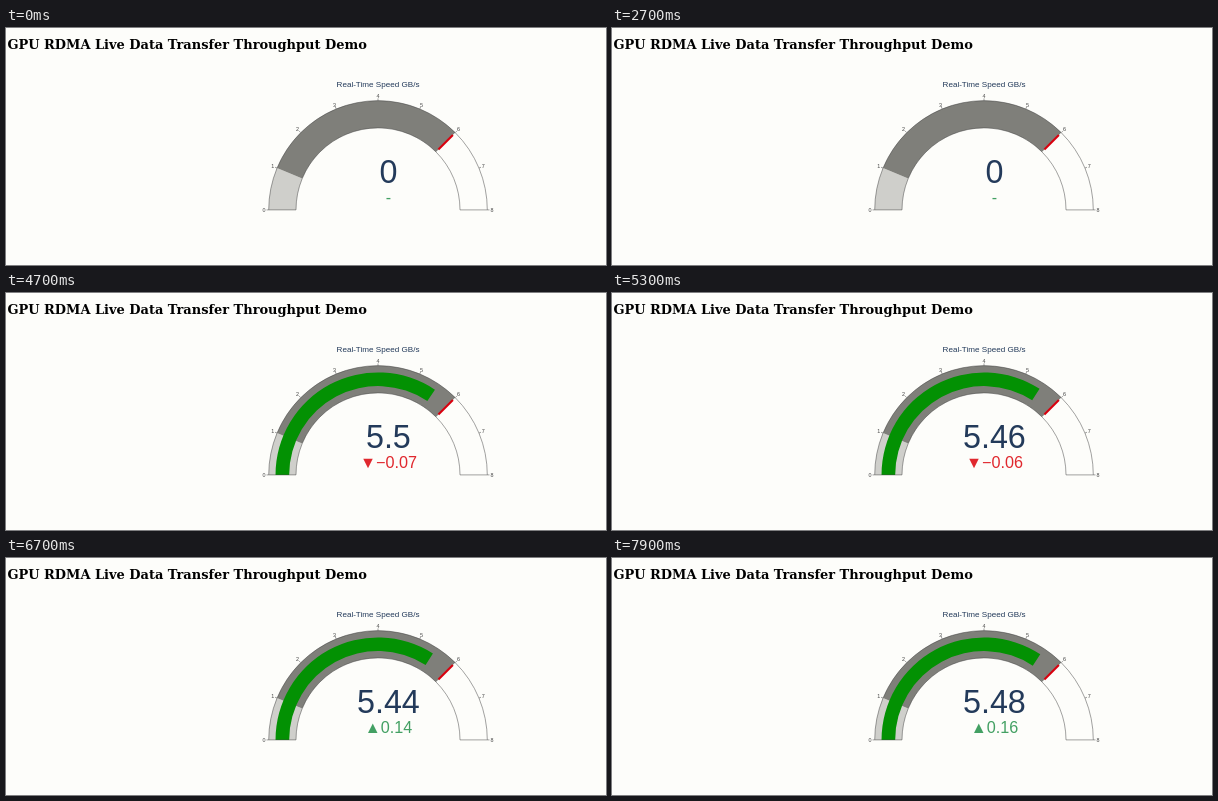
Write an HTML page that moves like this. It is 600 px wide and 237 px high and loops after 8000 ms.

```html
<!DOCTYPE html>
<html lang="en">
<head>
<meta charset="utf-8">
<title>Throughput gauge</title>
<style>
  html, body { margin: 0; width: 100%; height: 100%; overflow: hidden; background: #fdfdfa; }
  svg { display: block; width: 100%; height: 100%; }
  text { font-family: "Liberation Sans", Arial, sans-serif; fill: #233a5a; text-anchor: middle; }
  .heading { font: bold 12.96px "DejaVu Serif", serif; fill: #000; text-anchor: start; }
  .label { font-size: 8.1px; }
  .tick { font-size: 5.4px; fill: #444; }
  .line { fill: none; stroke: #444; stroke-width: .5; }
  #number { font-size: 32.3px; }
  #delta { font-size: 16.2px; }
</style>
</head>
<body>
<svg viewBox="0 0 600 237">
  <text class="heading" x="1.5" y="20.7">GPU RDMA Live Data Transfer Throughput Demo</text>
  <text class="label" x="372" y="59.3">Real-Time Speed GB/s</text>
  <path id="low" fill="#cfcfcb"/>
  <path id="high" fill="#7f7f7a"/>
  <path id="bar" fill="#039103"/>
  <path id="outline" class="line"/>
  <path id="threshold" stroke="#d8000e" stroke-width="2.1"/>
  <path id="ticks" class="line"/>
  <g id="tickLabels"></g>
  <text id="number" x="382.4" y="155.4"></text>
  <text id="delta" x="382.5" y="174.8"></text>
</svg>
<script>
const LOOP = 8000, START = 3900, STEP = 100;
const MAX = 8, CX = 372, CY = 181.9, INNER = 82, OUTER = 109.3;
const MIDDLE = (INNER + OUTER) / 2, WIDTH = OUTER - INNER;

// One reading per step, in GB/s
const readings = [
  5.54, 5.49, 5.46, 5.51, 5.48, 5.44, 5.52, 5.57, 5.5,
  5.47, 5.5, 5.43, 5.49, 5.52, 5.46, 5.51, 5.48, 5.45,
  5.5, 5.47, 5.53, 5.54, 5.48, 5.51, 5.46, 5.49, 5.52,
  5.3, 5.44, 5.5, 5.47, 5.52, 5.45, 5.49, 5.53, 5.48,
  5.46, 5.51, 5.47, 5.32, 5.48
];

const $ = id => document.getElementById(id);
const setPath = (id, d) => $(id).setAttribute("d", d);

function point(value, radius) {
  const angle = Math.PI * (1 - value / MAX);
  return [CX + radius * Math.cos(angle), CY - radius * Math.sin(angle)];
}

const spoke = (value, r1, r2) => `M${point(value, r1)}L${point(value, r2)}`;

function band(from, to, thickness = 1) {
  const inner = MIDDLE - WIDTH * thickness / 2;
  const outer = MIDDLE + WIDTH * thickness / 2;
  return `M${point(from, inner)}L${point(from, outer)}` +
    `A${outer} ${outer} 0 0 1 ${point(to, outer)}L${point(to, inner)}` +
    `A${inner} ${inner} 0 0 0 ${point(from, inner)}Z`;
}

function buildDial() {
  setPath("low", band(0, 1));
  setPath("high", band(1, 6));
  setPath("outline", band(0, MAX));
  setPath("threshold", spoke(6, MIDDLE - WIDTH * .375, MIDDLE + WIDTH * .375));
  let marks = "", labels = "";
  for (let v = 0; v <= MAX; v++) {
    const [x, y] = point(v, 113.9);
    marks += spoke(v, OUTER, OUTER + 2.2);
    labels += `<text class="tick" x="${x}" y="${y + 1.9}">${v}</text>`;
  }
  setPath("ticks", marks);
  $("tickLabels").innerHTML = labels;
}

const format = value => String(+value.toFixed(2));

function formatDelta(change) {
  if (Math.abs(change) < .005) return "-";
  return change > 0 ? "▲" + format(change) : "▼−" + format(-change);
}

function draw(time) {
  const index = Math.floor((time % LOOP - START) / STEP);
  const value = readings[index] ?? 0;
  const change = value - (readings[index - 1] ?? 0);
  setPath("bar", value ? band(0, value, .5) : "");
  $("number").textContent = format(value);
  $("delta").textContent = formatDelta(change);
  $("delta").style.fill = change <= -.005 ? "#e0282e" : "#43a063";
}

buildDial();
draw(0);
let origin;
requestAnimationFrame(function frame(now) {
  origin ??= now;
  draw(now - origin);
  requestAnimationFrame(frame);
});
</script>
</body>
</html>
```
